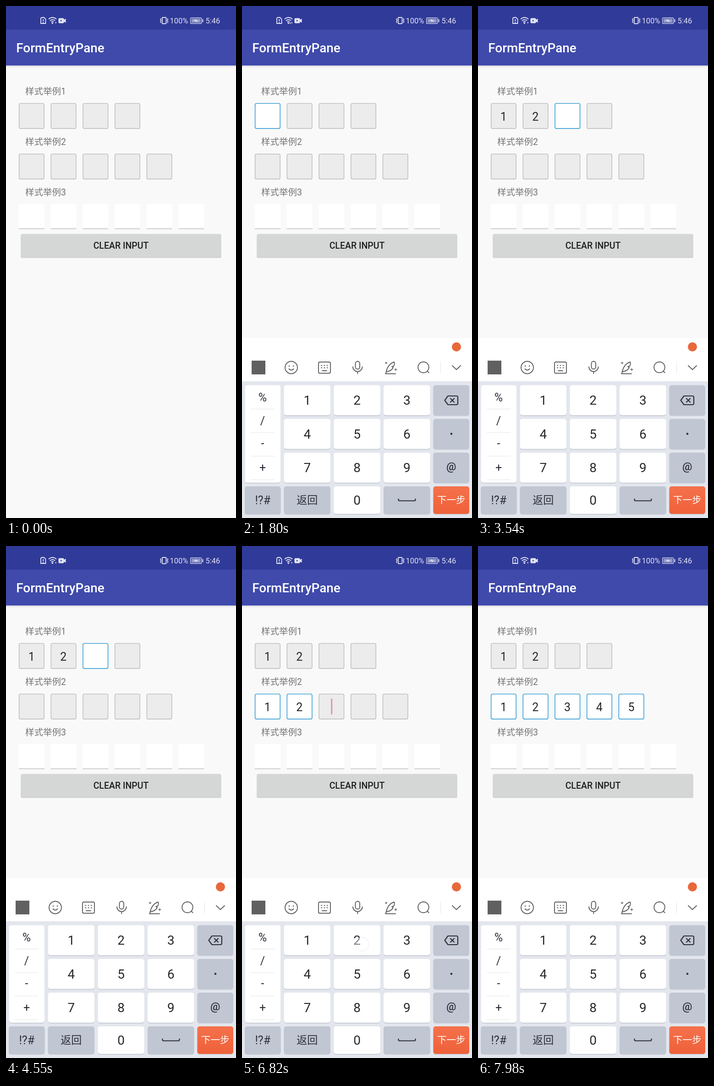
An HTML page that plays this animation: 502x1116 px, repeating every 8000 ms.

```html
<!DOCTYPE html>
<html lang="zh-CN">
<head>
<meta charset="utf-8">
<style>
html, body { margin: 0; width: 100%; height: 100%; overflow: hidden; background: #f9f9f9; }
svg { display: block; width: 502px; height: 1116px; font-family: Roboto, "Noto Sans CJK SC", "Noto Sans CJK", sans-serif; }
.mid { text-anchor: middle; }
.medium { font-weight: 500; }
.label { font-size: 19.5px; fill: #747474; }
.cell { fill: #ececec; stroke: #b9b9b9; stroke-width: 1.4; }
.cell.on { fill: #fff; stroke: #1f93cf; }
.digit { font-size: 25px; fill: #262626; text-anchor: middle; }
.key { fill: #fff; }
.key.grey, .key.down { fill: #c0c6d2; }
.key.next { fill: url(#next); }
.edge { fill: #c6cad4; }
.num { fill: #25272b; }
.sign { font-size: 25px; fill: #2b2f38; }
.go { fill: #fff; }
.line { fill: none; stroke: #606060; stroke-width: 1.9; stroke-linecap: round; stroke-linejoin: round; }
.ink { stroke: #2b2f38; stroke-width: 2.2; }
.status { fill: none; stroke: #e2e4f3; stroke-width: 1.8; }
.solid { fill: #e2e4f3; }
.dot { fill: #fff; fill-opacity: .62; stroke: #e6e9ef; stroke-width: 1.4; }
</style>
</head>
<body>
<svg id="stage" viewBox="0 0 502 1116">
  <defs>
    <linearGradient id="drop" x1="0" y1="0" x2="0" y2="1">
      <stop offset="0" stop-color="#000" stop-opacity=".12"/>
      <stop offset="1" stop-color="#000" stop-opacity="0"/>
    </linearGradient>
    <linearGradient id="next" x1="0" y1="0" x2="0" y2="1">
      <stop offset="0" stop-color="#f4724c"/>
      <stop offset="1" stop-color="#ef6039"/>
    </linearGradient>
  </defs>
  <rect width="502" height="1116" fill="#f9f9f9"/>
  <rect y="129.500" width="502" height="5" fill="url(#drop)"/>
  <rect width="502" height="129.700" fill="#3f4aab"/>
  <rect width="502" height="51.500" fill="#303a98"/>

  <g class="status">
    <path d="M78 25h5l3.500 3.500v9.500h-10.500v-11.500z"/>
    <path d="M81.300 28.500v5M81.300 35v2"/>
    <path d="M93 28.500q8.500-7 17 0M95.800 32q5.700-4.600 11.400 0M98.600 35q2.900-2 5.400 0"/>
    <rect x="341" y="25" width="8.500" height="13.500" rx="1"/>
    <path d="M338.500 27l-1.500 2 1.500 2.500-1.500 2.500 1.500 3M352 27l1.500 2-1.500 2.500 1.500 2.500-1.500 3" stroke-width="1.600"/>
    <rect x="402.600" y="25.600" width="24" height="12.800" rx="2" stroke-width="1.200"/>
  </g>
  <g class="solid">
    <circle cx="101.300" cy="37.600" r="1.700"/>
    <path d="M107 35.500h3.400l-1.700 3z"/>
    <path id="upload" d="M103.500 38.500h3.400l-1.700-3z"/>
    <path fill-rule="evenodd" d="M116.500 26.500h8a2 2 0 0 1 2 2v1.500l4-2.500v9l-4-2.500v1.500a2 2 0 0 1-2 2h-8a2 2 0 0 1-2-2v-7a2 2 0 0 1 2-2zM119 30v4l3.500-2z"/>
    <rect x="404.600" y="27.600" width="20" height="8.800" rx="1" opacity=".55"/>
    <path d="M408 32.500l7-3.500v2.500h6l-7 3.500v-2.500z"/>
    <rect x="428.400" y="28.500" width="2" height="7" rx="1"/>
    <text x="357.500" y="38" font-size="16.500">100%</text>
    <text x="435.500" y="38" font-size="16.500">5:46</text>
  </g>
  <text class="medium" x="22.300" y="101" font-size="27.900" fill="#fff">FormEntryPane</text>

  <text class="label" x="42" y="193">样式举例1</text>
  <text class="label" x="42" y="303">样式举例2</text>
  <text class="label" x="42" y="413">样式举例3</text>
  <g id="rows"></g>
  <rect id="caret" y="332.500" width="2.800" height="34.500" fill="#d8256f"/>

  <rect x="32" y="498" width="438" height="51.500" rx="3" fill="#000" opacity=".07"/>
  <rect x="32.500" y="497.500" width="437" height="51" rx="3" fill="#000" opacity=".13"/>
  <rect x="33" y="496.800" width="436" height="50.200" rx="2.500" fill="#d5d7d6"/>
  <text class="mid medium" x="251" y="529" font-size="19.500" fill="#1e1e1e">CLEAR INPUT</text>

  <g id="board">
    <rect y="724" width="502" height="94" fill="#fff"/>
    <rect y="818" width="502" height="298" fill="#e3e6ed"/>
    <circle cx="468" cy="743" r="10" fill="#e8683a"/>
    <rect x="21" y="773" width="30" height="30" fill="#606060"/>
    <g class="line">
      <circle cx="107.500" cy="788" r="13.500"/>
      <path d="M103 784v1.500M112 784v1.500M102.500 791q5 5.500 10 0"/>
      <rect x="167" y="776" width="26" height="24.500" rx="3"/>
      <path d="M173 783.500h1.300M179.300 783.500h1.300M185.500 783.500h1.300M173 788.500h1.300M179.300 788.500h1.300M185.500 788.500h1.300M175 795h10"/>
      <rect x="247.500" y="774.500" width="9.500" height="17" rx="4.700"/>
      <path d="M242 786.500a10.300 10.300 0 0 0 20.600 0M252.300 797v4.500"/>
      <path d="M314 801q3-20 18-25q2 4-1 9l-4 1 3 2q-4 8-14 9M313 801.500h22"/>
      <path d="M314.500 776v4M312.500 778h4M335.500 790v5M333 792.500h5" stroke-width="1.300"/>
      <circle cx="396" cy="787.500" r="11.800"/>
      <path d="M405 796.500l2.800 2.800M459 784l9 8.500 9-8.500"/>
    </g>
    <path d="M433.500 775v26" stroke="#e4e4e4"/>
    <g id="keys"></g>
    <g class="line ink">
      <path d="M449.500 850h19a2.500 2.500 0 0 1 2.500 2.500v14a2.500 2.500 0 0 1-2.500 2.500h-19l-7-9.500z"/>
      <path d="M455 855.500l8 8M463 855.500l-8 8M341.500 1074.500v2q0 2 3 2h31q3 0 3-2v-2"/>
    </g>
    <circle cx="457" cy="932.500" r="2.300" fill="#2b2f38"/>
  </g>
  <g id="dots"></g>
</svg>
<script>
const LOOP = 8000, STEP = 69.7;
const $ = id => document.getElementById(id);

function add(parent, tag, attrs, text = '') {
  const el = document.createElementNS('http://www.w3.org/2000/svg', tag);
  for (const name in attrs) el.setAttribute(name, attrs[name]);
  el.textContent = text;
  return parent.appendChild(el);
}

function makeRow(count, y) {
  return Array.from({ length: count }, (_, i) => {
    const x = 28 + i * STEP;
    return {
      box: add($('rows'), 'rect', { class: 'cell', x: x + .6, y: y + .6, width: 54.6, height: 54.6, rx: 3 }),
      text: add($('rows'), 'text', { class: 'digit', x: x + 27.7, y: y + 38 })
    };
  });
}

const rowA = makeRow(4, 211.8), rowB = makeRow(5, 322);
for (let i = 0; i < 6; i++) {
  const x = 28 + i * STEP;
  add($('rows'), 'rect', { x, y: 432, width: 56, height: 53, fill: '#fff' });
  add($('rows'), 'rect', { x, y: 484, width: 56, height: 2.8, fill: '#d9d9d9' });
}

const keys = {};
function makeKey(x, y, w, h, label, kind = '', style = 'num', size = 28, lift = 0) {
  const board = $('keys');
  add(board, 'rect', { class: 'edge', x, y: y + 1.7, width: w, height: h, rx: 5 });
  keys[label] = add(board, 'rect', { class: 'key ' + kind, x, y, width: w, height: h, rx: 5 });
  add(board, 'text', {
    class: 'mid ' + style, x: x + w / 2, y: y + h / 2 + size * .36 - lift, style: `font-size:${size}px`
  }, label);
}

const rowY = [826.5, 900, 973.5];
makeKey(6.5, 826.5, 77.5, 212.5, '');
[['%', 862], ['/', 912.5], ['-', 962], ['+', 1015]].forEach(([sign, y], i) => {
  add($('keys'), 'text', { class: 'mid sign', x: 45, y }, sign);
  add($('keys'), 'rect', { x: 19, y: 878 + i * 51.3, width: 52, height: 1, fill: '#e6e6e6' });
});
for (let n = 1; n <= 9; n++) makeKey(91.5 + (n - 1) % 3 * 108.8, rowY[Math.floor((n - 1) / 3)], 101.5, 65.5, n);
['', '', '@'].forEach((s, i) => makeKey(417.5, rowY[i], 78.5, 65.5, s, 'grey', 'sign medium', 24, 3));
makeKey(6, 1047, 78.5, 60, '!?#', 'grey', 'sign', 25);
makeKey(91.5, 1047, 101.5, 60, '返回', 'grey', 'sign', 23);
makeKey(200.3, 1047, 101.5, 60, 0);
makeKey(309.1, 1047, 101.5, 60, ' ', 'grey');
makeKey(417.5, 1047, 78.5, 60, '下一步', 'next', 'go', 20.7);

// Taps: finger down, finger up, x, y, key
const taps = [
  [1170, 1340, 176, 251],
  [2500, 2660, 127, 873, 1],
  [2700, 2850, 270, 871, 2],
  [5610, 5790, 176, 350],
  [6430, 6530, 127, 868, 1],
  [6640, 6740, 262, 868, 2],
  [6850, 6950, 372, 868, 3],
  [7050, 7150, 134, 934, 4],
  [7250, 7370, 272, 935, 5]
].map(([down, up, x, y, key]) => ({
  down, up, key, dot: add($('dots'), 'circle', { class: 'dot', cx: x, cy: y, r: 15 })
}));
const FOCUS_A = taps[0].up, FOCUS_B = taps[3].up, FADE = 240;

function paintRow(row, typed, isOn) {
  row.forEach((cell, i) => {
    cell.box.classList.toggle('on', isOn(i));
    cell.text.textContent = typed[i] || '';
  });
}

function draw(t) {
  let a = '', b = '', since = FOCUS_B;
  const held = {};
  for (const tap of taps) {
    const gone = Math.max(0, t - tap.up);
    tap.dot.style.opacity = t < tap.down ? 0 : Math.max(0, 1 - gone / FADE);
    if (!tap.key) continue;
    held[tap.key] = held[tap.key] || (t >= tap.down && t < tap.up);
    if (t < tap.up) continue;
    if (tap.up < FOCUS_B) a += tap.key;
    else { b += tap.key; since = tap.up; }
  }
  for (const key in held) keys[key].classList.toggle('down', held[key]);

  paintRow(rowA, a, i => t >= FOCUS_A && t < FOCUS_B && i === a.length);
  paintRow(rowB, b, i => i < b.length);

  const phase = (t - since) % 1000;
  const shown = t >= FOCUS_B && b.length < rowB.length && phase < 600;
  $('caret').style.opacity = shown ? Math.min(1, phase / 170) : 0;
  $('caret').setAttribute('x', 55 + b.length * STEP);

  const rise = Math.min(1, Math.max(0, (t - 1358) / 350));
  $('board').setAttribute('transform', `translate(0 ${392 * (1 - rise) ** 2})`);
  $('upload').style.opacity = t >= FOCUS_A && t < 3000 ? 1 : 0;
}

const start = performance.now();
function tick() {
  draw((performance.now() - start) % LOOP);
  requestAnimationFrame(tick);
}
tick();
</script>
</body>
</html>
```
